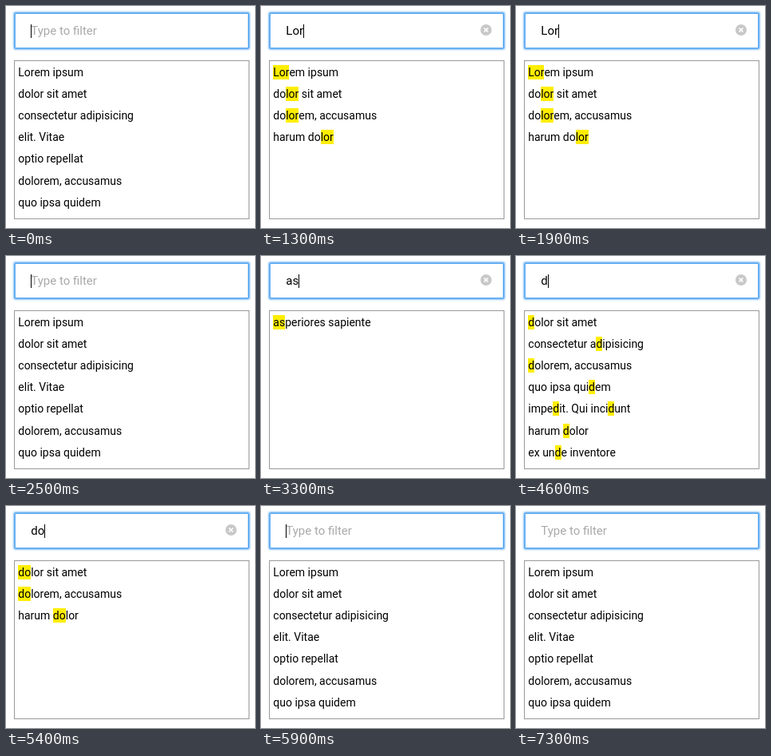
These frames come from a looping animation (312x278 px, 7.4 s). An HTML page:

```html
<!DOCTYPE html>
<html lang="en">
<head>
<meta charset="utf-8">
<title>Filter list</title>
<style>
  html, body { margin: 0; width: 100%; height: 100%; overflow: hidden; background: #fff; }
  body { position: relative; font-family: Roboto, sans-serif; color: #000; }
  .field, .list { position: absolute; left: 10px; width: 295px; box-sizing: border-box; }
  .field {
    top: 8px; height: 46px;
    border: 2px solid #68aff2; border-radius: 2px;
    box-shadow: 0 0 2px 1px rgba(104, 175, 242, .7);
    font-size: 15px; line-height: 42px; white-space: pre;
  }
  .field span { position: absolute; left: 19.3px; top: 0; }
  .hint { color: #a9a9a9; }
  .caret {
    display: inline-block; width: 1px; height: 17px;
    margin-right: -1px; vertical-align: -4px; background: #000;
  }
  .clear { position: absolute; left: 263px; top: 13px; width: 14px; height: 14px; }
  .list {
    top: 68px; height: 199px; overflow: hidden;
    border: 1px solid #999; padding: .6px 0 0 4.3px;
    font-size: 14px; line-height: 27.2px; white-space: nowrap;
  }
  .list div { height: 27.2px; }
  mark { background: #ffee00; color: inherit; padding: 1px 0; }
</style>
</head>
<body>
<div class="field">
  <span class="hint">Type to filter</span>
  <span><b id="query" style="font-weight:400"></b><i class="caret"></i></span>
  <svg class="clear" viewBox="-7 -7 14 14">
    <circle r="7" fill="#c8c8c8"/>
    <path d="M-2.5-2.5 2.5 2.5M2.5-2.5-2.5 2.5" stroke="#fff" stroke-width="1.7"/>
  </svg>
</div>
<div class="list"></div>
<script>
  const LOOP = 7400, BLINK = 500;
  const items = [
    "Lorem ipsum", "dolor sit amet", "consectetur adipisicing", "elit. Vitae",
    "optio repellat", "dolorem, accusamus", "quo ipsa quidem",
    "impedit. Qui incidunt", "harum dolor", "ex unde inventore", "asperiores sapiente"
  ];
  // Each key press: time in ms and the query after it.
  const keys = [
    [0, ""], [100, ""],
    [600, "L"], [900, "Lo"], [1200, "Lor"], [1400, "Lore"], [1600, "Lorem"],
    [1800, "Lore"], [1900, "Lor"], [2100, "Lo"], [2300, "L"], [2500, ""],
    [2900, "a"], [3300, "as"], [3800, "a"], [4200, ""],
    [4600, "d"], [4700, "do"], [4900, "dol"], [5300, "do"], [5600, "d"], [5800, ""]
  ];

  const $ = selector => document.querySelector(selector);
  const query = $("#query"), hint = $(".hint"), clear = $(".clear"),
        caret = $(".caret"), list = $(".list");
  const show = (el, on) => el.style.visibility = on ? "visible" : "hidden";
  let shown = null;

  function render(text) {
    const pattern = new RegExp(text, "gi");
    const matches = items.filter(item => item.toLowerCase().includes(text.toLowerCase()));
    list.innerHTML = matches
      .map(item => `<div>${text ? item.replace(pattern, "<mark>$&</mark>") : item}</div>`)
      .join("");
    query.textContent = text;
    show(hint, !text);
    show(clear, text);
    shown = text;
  }

  function tick() {
    const t = performance.now() % LOOP;
    const [pressed, text] = keys.filter(([time]) => time <= t).pop();
    if (text !== shown) render(text);
    show(caret, Math.floor((t - pressed) / BLINK) % 2 === 0);
    requestAnimationFrame(tick);
  }
  tick();
</script>
</body>
</html>
```
